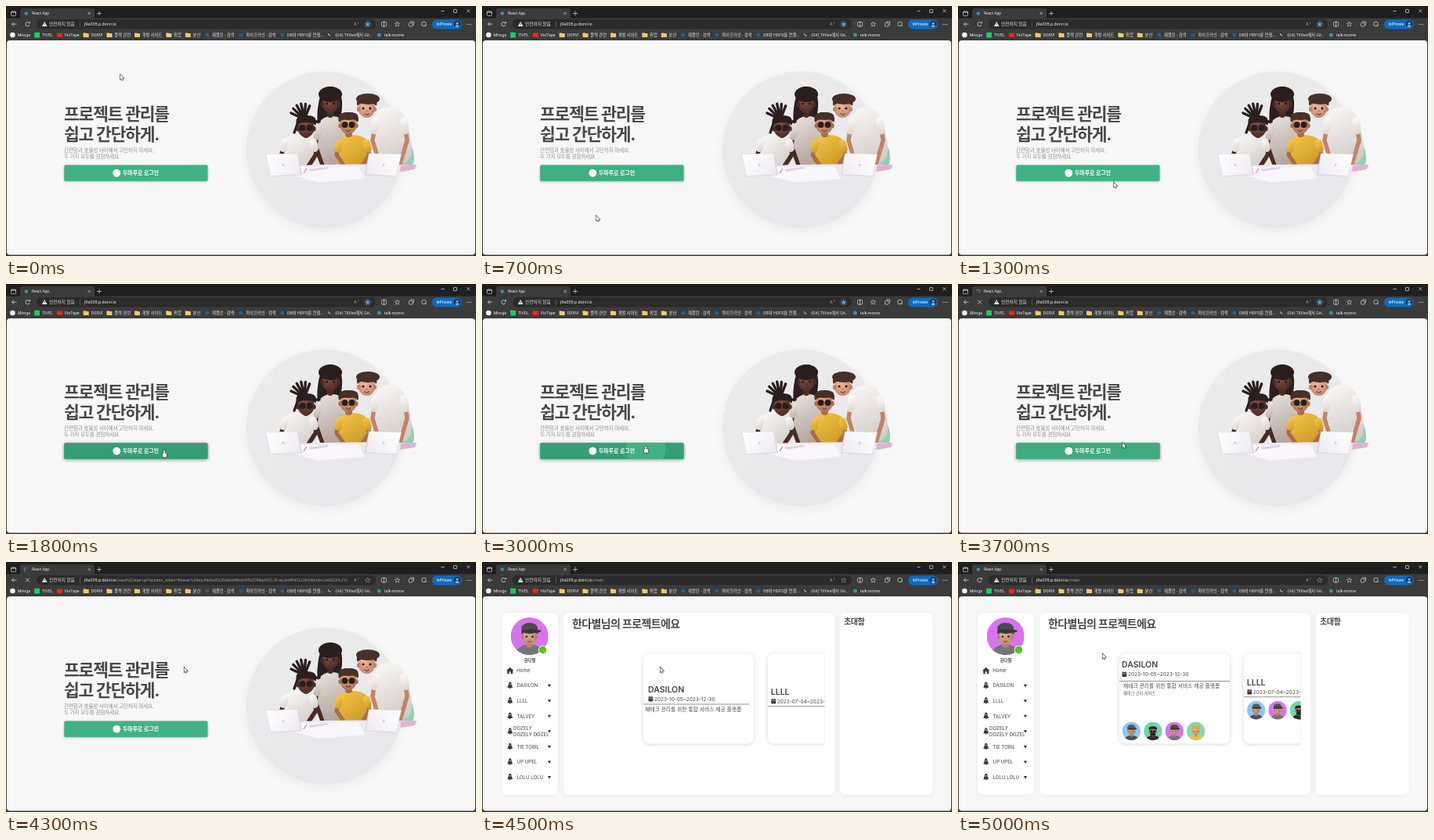
An HTML page with a canvas that plays this animation: 600 by 320 pixels, repeating every 5100 ms.

```html
<!DOCTYPE html>
<html lang="ko">
<head>
<meta charset="utf-8">
<title>React App</title>
<style>
html, body { margin: 0; width: 100%; height: 100%; overflow: hidden; background: #3b3b3b; }
canvas { display: block; width: 600px; height: 320px; }
</style>
</head>
<body>
<canvas id="stage"></canvas>
<script>
const LOOP = 5100, STEP = 100;
const CLICK = 2960, REDIRECT = 4200, MAIN = 4400, LOADED = 4700;
const UI = 'Roboto,"Noto Sans CJK KR",sans-serif';
const SANS = 'Inter,"Noto Sans CJK KR",sans-serif';
const INK = '#484848', DARK = '#3c3c3c', BAR = '#3b3b3b', ICON = '#d8d8d8';
const BUTTON = { x: 74.3, y: 203.5, w: 183.2, h: 20.5 };
const MOVES = [
  { from: 200, to: 850, x: 146, y: 297 },
  { from: 850, to: 1300, x: 199, y: 226 },
  { from: 1400, to: 1800, x: 202, y: 213 },
  { from: 2200, to: 2400, x: 209, y: 207.5 },
  { from: 3600, to: 4300, x: 227.5, y: 135 },
  { from: 4500, to: 5000, x: 184.5, y: 117.5 }
];
const canvas = document.getElementById('stage');
const ctx = canvas.getContext('2d');
const dpr = window.devicePixelRatio || 1;
canvas.width = 600 * dpr;
canvas.height = 320 * dpr;

const clamp = v => Math.max(0, Math.min(1, v));
const smooth = k => k * k * (3 - 2 * k);

function pointerAt(t) {
  let x = 146, y = 88;
  for (const m of MOVES) {
    const k = smooth(clamp((t - m.from) / (m.to - m.from)));
    x += (m.x - x) * k;
    y += (m.y - y) * k;
  }
  return { x, y };
}
function onButton(t) {
  const p = pointerAt(t), b = BUTTON;
  return p.x > b.x && p.x < b.x + b.w && p.y > b.y && p.y < b.y + b.h;
}
// share of the last 250 ms spent over the button
function hoverAt(t) {
  let n = 0;
  for (let i = 0; i < 25; i++) n += onButton(t - i * 10);
  return n / 25;
}

function text(s, x, cy, size, color, { font = UI, weight = 400, gap = 0, align = 'left' } = {}) {
  ctx.font = `${weight} ${size}px ${font}`;
  ctx.letterSpacing = gap + 'px';
  ctx.textAlign = align;
  ctx.fillStyle = color;
  ctx.fillText(s, x, cy + size * .37);
  const width = ctx.measureText(s).width;
  ctx.letterSpacing = '0px';
  return width;
}
function fill(color) {
  ctx.fillStyle = color;
  ctx.fill();
}
function stroke(color, width) {
  ctx.strokeStyle = color;
  ctx.lineWidth = width;
  ctx.stroke();
}
function box(x, y, w, h, r, color) {
  ctx.beginPath();
  ctx.roundRect(x, y, w, h, r);
  fill(color);
}
function frame(x, y, w, h, r) {
  ctx.beginPath();
  ctx.roundRect(x, y, w, h, r);
  stroke(ICON, .7);
}
function oval(x, y, rx, ry, color) {
  ctx.beginPath();
  ctx.ellipse(x, y, rx, ry, 0, 0, 7);
  fill(color);
}
const dot = (x, y, r, color) => oval(x, y, r, r, color);
function ring(x, y, r, color, width, from = 0, to = 7) {
  ctx.beginPath();
  ctx.arc(x, y, r, from, to);
  stroke(color, width);
}
function trace(pts, close) {
  ctx.beginPath();
  for (let i = 0; i < pts.length; i += 2) ctx.lineTo(pts[i], pts[i + 1]);
  if (close) ctx.closePath();
}
function poly(color, ...pts) {
  trace(pts, true);
  fill(color);
}
function line(color, width, ...pts) {
  trace(pts);
  stroke(color, width);
}
function cross(x, y, r, color, width) {
  line(color, width, x - r, y - r, x + r, y + r);
  line(color, width, x + r, y - r, x - r, y + r);
}
// closed soft shape through the midpoints of its corners
function softPath(p) {
  const n = p.length;
  ctx.beginPath();
  ctx.moveTo((p[n - 2] + p[0]) / 2, (p[n - 1] + p[1]) / 2);
  for (let i = 0; i < n; i += 2) {
    const j = (i + 2) % n;
    ctx.quadraticCurveTo(p[i], p[i + 1], (p[i] + p[j]) / 2, (p[i + 1] + p[j + 1]) / 2);
  }
}
function blob(color, ...pts) {
  softPath(pts);
  fill(color);
}
function limb(color, width, ...pts) {
  ctx.lineCap = ctx.lineJoin = 'round';
  line(color, width, ...pts);
  ctx.lineCap = 'butt';
  ctx.lineJoin = 'miter';
}
function blend(x0, y0, x1, y1, a, b) {
  const g = ctx.createLinearGradient(x0, y0, x1, y1);
  g.addColorStop(0, a);
  g.addColorStop(1, b);
  return g;
}
function clipped(path, draw) {
  ctx.save();
  ctx.beginPath();
  path();
  ctx.clip();
  draw();
  ctx.restore();
}
function shaded(alpha, blur, dy, draw) {
  ctx.save();
  ctx.shadowColor = `rgba(0,0,0,${alpha})`;
  ctx.shadowBlur = blur * dpr;
  ctx.shadowOffsetY = dy * dpr;
  draw();
  ctx.restore();
}
function star(x, y, r, color, solid) {
  const pts = [];
  for (let i = 0; i < 10; i++) {
    const a = i * Math.PI / 5 - Math.PI / 2, d = i % 2 ? r * .45 : r;
    pts.push(x + d * Math.cos(a), y + d * Math.sin(a));
  }
  trace(pts, true);
  solid ? fill(color) : stroke(color, .6);
}

const folder = x => {
  box(x, 34.2, 3.5, 3, .5, '#d9a440');
  box(x, 35, 7, 5, .6, '#f3c867');
};
const disc = color => x => dot(x + 3.3, 37, 2.5, color);
const search = disc('#1f5f8f');
const BOOKMARKS = [
  ['Miroga', x => dot(x + 3.4, 37, 3.3, '#f1f1f1')],
  ['TIVEL', x => box(x, 33.7, 6.8, 6.8, .5, '#19ce60')],
  ['VioTape', x => box(x, 34.5, 7.4, 5.3, 1.2, '#f0281e')],
  ['DORVI', folder], ['플젝 관련', folder], ['개발 사이트', folder], ['취업', folder], ['분산', folder],
  ['재플린 - 검색', search], ['파이프라인 - 검색', search], ['DB와 HDFS를 연결...', search],
  ['(Git) TilVex에서 Git...', x => ring(x + 4, 35.2, 3, '#c9c9c9', 1, 1.6, 3.2)],
  ['talk-morne', disc('#3e8fa3')]
];

function tabs(t, loading) {
  box(0, 0, 600, 15.5, 0, '#1f1f1f');
  box(18, 3, 95, 16, 3, BAR);
  frame(6.5, 7, 6, 5.5, 1);
  line(ICON, 1, 6.5, 8, 12.5, 8);
  if (!loading) dot(25.8, 9.5, 2.3, '#3e8fa3');
  else if (t < 3600) ring(25.5, 9.5, 2.3, '#8a8a8a', .7, t / 130, t / 130 + 1.2);
  else ring(25.5, 9.5, 2.3, '#4aa8e8', .8, t / 130, t / 130 + 4);
  text('React App', 33, 9.6, 4.8, '#e8e8e8');
  cross(106.2, 9.5, 1.7, ICON, .6);
  line(ICON, .7, 116, 9.5, 122, 9.5);
  line(ICON, .7, 119, 6.5, 119, 12.5);
  line(ICON, .7, 555.5, 6.5, 559.5, 6.5);
  frame(571.5, 4.5, 4, 4, .5);
  cross(590.3, 6.3, 2, ICON, .7);
}

function toolbar(t, loading) {
  const y = 23.2;
  line(ICON, .8, 13.5, y, 7.5, y);
  line(ICON, .8, 10.2, y - 2.7, 7.5, y, 10.2, y + 2.7);
  if (loading) cross(27.5, y, 2.5, ICON, .8);
  else {
    ring(27.5, y, 2.6, ICON, .8, .3, 5.6);
    poly(ICON, 28.3, 22.3, 30.8, 22.3, 30.8, 19.7);
  }
  box(39, 17, 433, 12.5, 6, '#2b2b2b');
  poly('#e8e8e8', 49.2, 20, 52.6, 26, 45.8, 26);
  line('#2b2b2b', .7, 49.2, 22, 49.2, 24.3);
  text('안전하지 않음', 55, y, 5.7, '#e4e4e4');
  line('#6a6a6a', .6, 94.5, 19, 94.5, 27.5);
  const end = 100 + text('j9e205.p.dorvi.io', 100, y, 5.5, '#f0f0f0');
  if (t >= MAIN) text('/main', end, y, 5.5, '#9c9c9c');
  else if (t >= REDIRECT) clipped(() => ctx.rect(100, 16, 336, 14), () =>
    text('/oauth2/sign-up?access_token=Bearer%20eyJhbGciOiJIUzUxMiIsInR5cCI6IkpXVCJ9.eyJzdWIiOiJUb2tlbiIsInJvbGUiOiJ1c2VyIiwiZXhwIjoxNzAw',
      end, y, 5.5, '#9c9c9c'));
  text('A', 444, y, 5.4, '#aaa');
  ring(448.2, 21.5, 1.6, '#aaa', .5, -1, 1);
  const saved = t < REDIRECT;
  if (saved) dot(461.7, y, 5, '#3b414a');
  star(461.7, y + .2, 3.4, saved ? '#5aa9f0' : '#999', saved);
  frame(479.5, 20.5, 6, 5.5, 1);
  line(ICON, .7, 482.5, 19.5, 482.5, 27);
  star(499.5, y + .2, 3.3, ICON);
  frame(514.5, 21.5, 4.5, 4.5, .8);
  line(ICON, .7, 516, 20, 520.5, 20, 520.5, 24.5);
  ring(533.5, 23, 2.8, ICON, .7);
  dot(535.5, 25, 1.3, '#5bb974');
  box(544, 17.5, 38, 12, 6, '#0f6cbd');
  text('InPrivate', 549.5, 23.4, 5, '#fff');
  dot(576, 23.4, 4.6, '#173a5e');
  dot(576, 22.2, 1.5, '#7fb2df');
  oval(576, 25.8, 2.6, 1.6, '#7fb2df');
  for (let i = -1; i < 2; i++) dot(591 + i * 2.3, 23.4, .55, ICON);
}

function browser(t) {
  const loading = t >= 3100 && t < MAIN;
  box(0, 0, 600, 320, 0, BAR);
  tabs(t, loading);
  toolbar(t, loading);
  let x = 5;
  for (const [name, icon] of BOOKMARKS) {
    icon(x);
    x += 14.7 + text(name, x + 9.7, 37.2, 5.3, '#e6e6e6');
  }
  box(1, 44, 598, 274.5, 4, '#f7f7f8');
}

function face(x, y, r, skin, hair, glasses) {
  const tone = ctx.createRadialGradient(x - r * .3, y - r * .3, r * .2, x, y, r * 1.1);
  tone.addColorStop(0, skin[0]);
  tone.addColorStop(1, skin[1]);
  oval(x, y, r * .88, r, tone);
  for (const side of [-1, 1]) {
    oval(x + side * r * .85, y + r * .1, r * .2, r * .26, skin[1]);
    const size = glasses ? .33 : .13;
    oval(x + side * r * .37, y, r * size, r * size, '#2a1d1b');
  }
  oval(x, y + r * .3, r * .14, r * .12, '#0002');
  ring(x, y + r * .42, r * .25, '#59302acc', r * .1, .4, 2.7);
  blob(hair, x - r * 1.05, y - r * .1, x - r * 1.05, y - r * 1.3, x + r * 1.05, y - r * 1.35,
    x + r * 1.1, y - r * .1, x + r * .7, y - r * .62, x - r * .7, y - r * .58);
}

// torso centred on x, its arms resting on the desk
function body(x, top, w, h, lean, shirt, skin) {
  const low = top + h, half = w / 2;
  softPath([x - half * .6, top, x + half * .6, top, x + half * 1.15, top + h * .3, x + half + lean, low,
    x - half + lean, low, x - half * 1.15, top + h * .3]);
  fill(blend(x - half * .5, top, x + half, low, ...shirt));
  for (const side of [-1, 1]) {
    const sx = x + side * half * .86, ex = x + side * half * 1.05, sy = top + h * .24, ey = top + h * .58;
    limb(skin[1], w * .13, sx, sy, ex, ey, x + side * half * .6, 204);
    limb(blend(sx - 5, sy, sx + 5, ey, ...shirt), w * .23, sx, sy, (sx + ex) / 2, (sy + ey) / 2);
  }
}

function laptop(x, dir) {
  ctx.save();
  ctx.translate(x, 188.5);
  ctx.scale(dir, 1);
  poly('#dcd8df', -1, 1, 41, 0, 46, 28, 6, 30);
  poly(blend(0, 0, 40, 30, '#ffffff', '#eeebf0'), 0, 1.5, 40, .5, 44, 27, 6, 29);
  oval(22, 15, 1.5, 1.8, '#d6d3da');
  ctx.restore();
}

function team() {
  const deep = ['#7a4b3c', '#4a2b25'], warm = ['#e0a27c', '#a86d50'], fair = ['#eab293', '#c08468'];
  const white = ['#f8f6f4', '#cfc7c3'], beige = ['#e4deda', '#a99a93'], yellow = ['#f1c344', '#c68f22'];
  const black = '#2a1e1f', brown = '#46302a';

  blob(black, 400, 112, 414, 100, 430, 112, 428, 148, 404, 162, 396, 150);
  body(416, 141, 40, 64, 0, beige, deep);
  box(410, 132, 8, 11, 4, deep[1]);
  face(414, 125, 12, deep, black);
  oval(414, 113, 15, 10, black);

  blob('#8ed0b3', 498, 178, 518, 172, 523, 208, 498, 208);
  body(490, 129, 42, 74, 10, white, fair);
  face(460.5, 131, 12, fair, brown);
  oval(462, 119, 15, 7, brown);

  body(443, 165, 40, 44, 0, yellow, warm);
  box(433, 160, 9, 8, 4, warm[1]);
  face(437, 152, 12, warm, brown, true);
  oval(437, 141, 12, 5, brown);

  body(374, 164, 42, 44, 0, white, deep);
  for (let i = 0; i < 6; i++) {
    const a = i * .36 - 2.8;
    limb(black, 3.4, 381, 145, 379 + Math.cos(a) * 16, 143 + Math.sin(a) * 18);
  }
  for (const side of [-1, 1]) limb(black, 3.4, 383 + side * 10, 148, 384 + side * 16, 155 - side * 7);
  box(379, 161, 8, 8, 4, deep[1]);
  face(383, 156, 12, deep, black, true);

  blob('#ece8f0', 335, 210, 366, 203, 526, 202, 524, 209, 470, 221, 390, 227, 360, 219);
  poly('#f8f6fa', 367, 217, 371, 206, 450, 205, 458, 221, 400, 226);
  poly('#ddd4e6', 386, 209, 410, 206, 412, 208, 389, 212);
  poly('#dfb3d0', 504, 204, 524, 203, 522, 209, 503, 212);
  line('#c45b9a', 1, 380, 214, 384, 208);
  laptop(332, 1);
  laptop(504, -1);
}

function loginButton(t) {
  const { x, y, w, h } = BUTTON, hover = hoverAt(t);
  shaded(.3 + hover * .15, 2.5 + hover * 2, 1, () => box(x, y, w, h, 1.6, '#41b286'));
  box(x, y, w, h, 1.6, `rgba(54,158,118,${hover})`);
  const age = (t - CLICK) / 550;
  if (age > 0 && age < 2) {
    const grow = 1 - Math.pow(1 - clamp(age), 2.7);
    clipped(() => ctx.roundRect(x, y, w, h, 1.6), () =>
      dot(209, 211, 138 * grow, `rgba(90,200,150,${.4 * clamp(2 - age)})`));
  }
  dot(141.3, 213.8, 4.9, '#fff');
  text('두마루로 로그인', 149, 213.8, 6.9, '#fff', { font: SANS, weight: 700 });
}

function hero(t) {
  const big = { font: SANS, weight: 700, gap: -1.2 }, small = { font: SANS, weight: 300, gap: -.33 };
  text('프로젝트 관리를', 74, 138.2, 21.5, INK, big);
  text('쉽고 간단하게.', 74, 163.8, 21.5, INK, big);
  text('간편함과 효율성 사이에서 고민하지 마세요,', 74, 184, 6.8, '#929292', small);
  text('두 가지 모두를 경험하세요.', 74, 192.3, 6.8, '#929292', small);
  loginButton(t);
  shaded(.05, 14, 4, () => dot(407, 184, 100.2, blend(340, 100, 470, 280, '#ebebec', '#e8e8ea')));
  team();
}

const LOOKS = [
  { back: '#d873ec', skin: ['#dbae90', '#b98468'], hair: '#4c4a50', top: '#77747a', cap: true },
  { back: '#8cc7f0', skin: ['#d6ae96', '#b0846c'], hair: '#5b5a60', top: '#4d5059', cap: true },
  { back: '#6fd6ac', skin: ['#b88669', '#8a5b43'], hair: '#25242a', top: '#2b2c31', beard: true },
  { back: '#7bdcae', skin: ['#e6bb94', '#c8946a'], hair: '#e5a63c', top: '#e7bf4b', crown: true }
];
function avatar(x, y, r, kind) {
  const { back, skin, hair, top, cap, beard, crown } = LOOKS[kind];
  clipped(() => ctx.arc(x, y, r, 0, 7), () => {
    ctx.translate(x, y);
    ctx.scale(r, r);
    box(-1, -1, 2, 2, 0, back);
    oval(0, .92, .72, .48, top);
    box(-.16, .25, .32, .35, .1, skin[1]);
    face(0, .02, .42, skin, hair, beard);
    if (beard) oval(0, .32, .3, .2, hair);
    if (crown) for (let i = -1; i < 2; i++) poly(hair, i * .3 - .2, -.3, i * .34, -.82, i * .3 + .2, -.3);
    if (cap) {
      oval(0, -.42, .44, .3, hair);
      oval(.1, -.27, .52, .1, '#39383e');
    }
  });
}

function rocket(x, y) {
  oval(x, y - .7, 1.9, 3.7, DARK);
  poly(DARK, x - 3.3, y + 3, x - 2.4, y - .4, x + 2.4, y - .4, x + 3.3, y + 3);
  dot(x, y - 1.5, .7, '#fff');
  poly(DARK, x - 1, y + 3, x + 1, y + 3, x, y + 4.6);
}
function panel(x, y, w, h, r, glow = .05) {
  shaded(glow, 4, .8, () => box(x, y, w, h, r, '#fff'));
}

function sidebar() {
  const label = (s, x, y) => text(s, x, y, 6.1, DARK, { font: SANS });
  avatar(60.7, 95, 24, 0);
  dot(77.5, 112.5, 5.6, '#fff');
  dot(77.5, 112.5, 4.7, '#50c41c');
  text('한다별', 61, 126.3, 5.2, '#333', { font: SANS, weight: 700, align: 'center' });
  poly(DARK, 31, 139.3, 35.8, 134.8, 40.6, 139.3);
  box(32.3, 139, 7, 4.2, 0, DARK);
  box(34.8, 140.3, 2, 3, 0, '#fff');
  label('Home', 44.3, 139);
  ['DASILON', 'LLLL', 'TALVEY', 'DOZELY|DOZELY DOZEL', 'TIE TOBIL', 'UP UPEL', 'LOLU LOLU'].forEach((name, i) => {
    const y = 158.2 + i * 19.55, rows = name.split('|'), wraps = rows.length > 1;
    rocket(35.8, y - .3);
    rows.forEach((row, n) => label(row, wraps ? 40 : 44.6, y + (wraps ? n * 7.7 - 3.7 : 0)));
    poly('#333', 83.8, y - 1.5, 88.2, y - 1.5, 86, y + 2);
  });
}

function cardHead(name, dates, x, y) {
  text(name, x, y, 10.5, '#444', { font: SANS, weight: 600 });
  const top = y + 9.6;
  box(x + .4, top, 6, 5.8, .8, DARK);
  line('#fff', .5, x + .4, top + 1.7, x + 6.4, top + 1.7);
  for (const dx of [2, 4.8]) line(DARK, .8, x + dx, top - .8, x + dx, top + .6);
  text(dates, x + 8, y + 12.4, 6.5, '#444', { font: SANS });
}
function cards(loaded) {
  for (const x of [205.7, 364.7]) panel(x, 117, 141.3, 115.5, 8, .16);
  const y = loaded ? 131.5 : 163, y2 = loaded ? 154 : 166, rule = loaded ? 152.5 : 182;
  cardHead('DASILON', '2023-10-05~2023-12-30', loaded ? 209 : 212, y);
  line('#777', .8, 206, rule, loaded ? 347 : 341, rule);
  text('재테크 관리를 위한 통합 서비스 제공 플랫폼', loaded ? 211 : 208, rule + 6.5, 6.75, '#444', { font: SANS });
  cardHead('LLLL', '2023-07-04~2023-09-27', 368.8, y2);
  line('#777', .8, 365, y2 + 18.7, 437.5, y2 + 18.7);
  if (!loaded) return;
  text('재테크 관리 서비스', 211, 168.5, 5.2, '#555', { font: SANS });
  [1, 2, 0, 3].forEach((kind, i) => avatar(221.4 + i * 27.4, 216.5, 11.7, kind));
  [1, 0, 2].forEach((kind, i) => avatar(380.6 + i * 27.4, 189.8, 11.7, kind));
}

function board(t) {
  panel(25, 65, 72, 233, 7);
  panel(104, 65, 346, 233, 7);
  panel(456.5, 65, 119, 233, 7);
  sidebar();
  text('한다별님의 프로젝트에요', 115, 78.6, 14, INK, { font: SANS, weight: 700, gap: -.62 });
  text('초대함', 462, 76.2, 10, INK, { font: SANS, weight: 700, gap: -.45 });
  clipped(() => ctx.rect(190, 100, 247.5, 150), () => cards(t >= LOADED));
}

function pointer(t) {
  const { x, y } = pointerAt(t);
  ctx.save();
  ctx.translate(x, y);
  ctx.beginPath();
  if (onButton(t)) {
    ctx.roundRect(-.8, 0, 1.6, 6, .8);
    ctx.roundRect(-2.2, 3.6, 5.4, 5, 1.6);
  } else trace([0, 0, 0, 6, 1.4, 4.8, 2.3, 7, 3.3, 6.5, 2.4, 4.5, 4.3, 4.3], true);
  stroke('#333', 1.2);
  fill('#fff');
  ctx.restore();
}

function draw() {
  const t = Math.floor(performance.now() % LOOP / STEP) * STEP;
  ctx.setTransform(dpr, 0, 0, dpr, 0, 0);
  browser(t);
  (t < MAIN ? hero : board)(t);
  pointer(t);
  requestAnimationFrame(draw);
}
draw();
</script>
</body>
</html>
```
